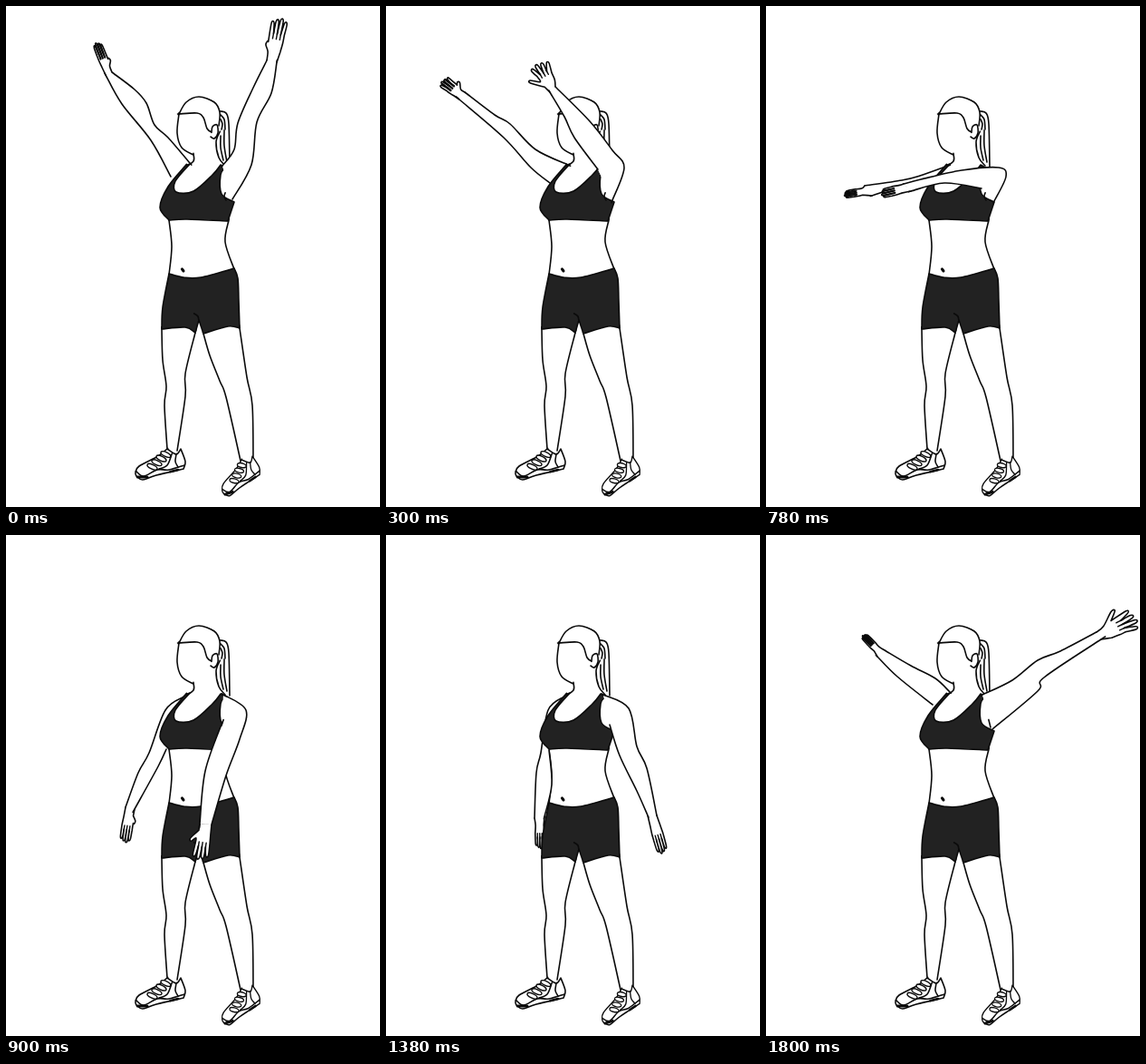
These frames come from a looping animation (413 by 552 pixels, 2100 ms). An HTML page with a canvas:

```html
<!DOCTYPE html>
<html lang="en">
<head>
<meta charset="utf-8">
<title>Arm circles</title>
<style>
html, body { margin: 0; width: 100%; height: 100%; overflow: hidden; background: #fff; }
canvas { display: block; width: 413px; height: 552px; }
</style>
</head>
<body>
<canvas id="stage"></canvas>
<script>
const W = 413, H = 552, HOLD = 300;
const INK = '#0a0a0a', CLOTH = '#222', SKIN = '#fff';
const canvas = document.getElementById('stage');
const ctx = canvas.getContext('2d');
const ratio = window.devicePixelRatio || 1;
canvas.width = W * ratio;
canvas.height = H * ratio;

const points = text => text.trim().split(/\s+/).map(p => p.split(',').map(Number));

// Adds a smooth curve through all the points.
function join(path, p) {
  for (let i = 0; i < p.length - 1; i++) {
    const a = p[i], b = p[i + 1], before = p[i - 1] || a, after = p[i + 2] || b;
    path.bezierCurveTo(
      a[0] + (b[0] - before[0]) / 6, a[1] + (b[1] - before[1]) / 6,
      b[0] - (after[0] - a[0]) / 6, b[1] - (after[1] - a[1]) / 6,
      b[0], b[1]);
  }
}

// Smooth runs that meet in corners.
function outline(runs) {
  const path = new Path2D();
  let last = runs[0][0];
  path.moveTo(...last);
  for (const run of runs) {
    join(path, [last, ...run]);
    last = run[run.length - 1];
  }
  return path;
}

function paint(path, fill, width = 1.6) {
  if (fill) {
    ctx.fillStyle = fill;
    ctx.fill(path);
  }
  ctx.lineWidth = width;
  ctx.stroke(path);
}

const shape = (text, fill, width) => paint(outline(text.split('/').map(points)), fill, width);
const line = (text, width) => shape(text, null, width);

// A hand from wrist a-b to the tip; thumb is its reach, negative on the side of a.
function hand(a, b, tip, { half, fan = 0, thumb = 0, ink = 1.4 }) {
  const mx = (a[0] + b[0]) / 2, my = (a[1] + b[1]) / 2;
  const ux = tip[0] - mx, uy = tip[1] - my, len = Math.hypot(ux, uy);
  const turn = (b[1] - a[1]) * ux - (b[0] - a[0]) * uy > 0 ? 1 : -1;
  const at = (s, t) => [mx + ux * s - turn * uy / len * t, my + uy * s + turn * ux / len * t];
  const runs = [[a]], side = Math.sign(thumb), w = half / 4;
  const thumbRun = () => {
    const out = side * (half + Math.abs(thumb)), s = 0.35 + Math.abs(thumb) / 40;
    const run = [at(0.2, side * half * 0.8), at(s - 0.06, out), at(s + 0.03, out - side), at(0.42, side * half)];
    runs.push(side < 0 ? run : run.reverse());
  };
  if (side < 0) thumbRun();
  else runs.push([at(0.25, -half * 0.9), at(0.5, -half)]);
  for (let i = 0; i < 4; i++) {
    const c = (i - 1.5) / 1.5, t = c * half * 0.75;
    const end = 1 - 0.09 * Math.abs(c - 0.2), mid = t + c * fan;
    runs.push([at(end - 0.06, mid - w * 0.8), at(end, mid), at(end - 0.06, mid + w * 0.8), at(0.62, t + w)]);
  }
  if (side > 0) thumbRun();
  else runs.push([at(0.45, half), at(0.25, half * 0.9)]);
  runs.push([b]);
  paint(outline(runs), SKIN);
  for (let i = 1; i < 4; i++) {
    const t = (i - 2) * half / 2;
    paint(outline([[at(0.52, t), at(ink > 2 ? 0.92 : 0.68, t)]]), null, ink);
  }
}

// One edge runs shoulder to wrist, the other wrist to armpit.
function arm(outer, inner, tip, look) {
  const p = points(outer), q = points(inner);
  const a = p[p.length - 1], b = q[0];
  const skin = outline([p, [b], q]);
  ctx.fillStyle = SKIN;
  ctx.fill(skin);
  hand(a, b, tip, look);
  ctx.fillStyle = SKIN;
  ctx.fill(skin);
  paint(outline([p]));
  paint(outline([q]));
}

function head() {
  line('237,116 243,118 246,130 247,177');
  line('237,120 241,125 242,136');
  line('237,125 239,130 238,136');
  line('236,139 232,150 235,167 242,176');
  line('237,144 237,156 240,170');
  line('241,138 241,154 244,172');
  line('191,119 189,140 194,156 207,164');
  line('207,163 207,171 197,178');
  line('191,119 199,106 213,100 230,106 236,117 235,132');
  line('191,119 211,118 218,123 222,135 227,139');
  shape('227,139 228,133 233,131 234,140 230,146 226,144', SKIN);
}

function legs() {
  line('180,236 183,265 180,296');
  line('246,236 242,260 252,290');
  line('172,356 173,390 177,419 175,440 178,488');
  line('209,360 198,405 198,430 189,490');
  line('218,361 225,385 236,413 243,431 259,501');
  line('258,355 266,409 272,440 273,502');
}

function shoe(...place) {
  ctx.save();
  ctx.transform(...place);
  shape('0,0 -10,8 -31,19 -35,26 -34,30/-27,34 -12,29 18,22/20,14 15,0/10,6 0,0', SKIN);
  line('-34,25 -26,30 -11,23 2,23 19,18');
  line('-32,31 -22,31', 3);
  line('4,25 12,23', 2.5);
  for (let i = 0; i < 4; i++) {
    const lace = new Path2D();
    lace.ellipse(-1.5 - 5 * i, 6 + 4.6 * i, 6, 2.4, 0.45, 0, Math.PI * 2);
    paint(lace, SKIN, 1.4);
  }
  line('5,6 0,18 -9,22');
  line('10,6 9,14 12,20');
  ctx.restore();
}

function clothes() {
  shape('198,176 179,199 170,222 180,236/200,235 245,237/252,216/238,207 237,186 242,178/237,175/228,186 207,204 188,205 187,193 203,174/198,176', CLOTH);
  shape('180,295/196,299 215,299 252,289/256,300 257,325 258,355/245,353 218,361/213,346/209,360/198,354 172,356/173,332 180,295', CLOTH);
  line('208,339 212,342 213,348');
  line('194.5,290 196,292', 3);
}

const armpit = () => line('242,206 241,210 243,214');

const high = {
  far() {
    arm('203,173 179,145 164,131 155,107 142,92 117,73', '110,76 128,108 160,148 182,188',
      [100, 40], { half: 5, thumb: -2, ink: 2.2 });
  },
  near() {
    arm('239,176 252,158 256,129 273,90 288,60', '299,62 293,96 277,128 271,175 250,213',
      [303, 13], { half: 8, fan: 1, thumb: -2 });
    armpit();
  }
};

const forward = {
  far() {
    arm('201,175 165,158 137,130 120,120 87,95', '81,103 130,145 160,178 181,195',
      [62, 82], { half: 6, fan: 1, thumb: -4, ink: 2.4 });
  },
  near() {
    arm('250,214 263,178 250,159 225,127 187,89', '181,95 197,122 208,145 234,180',
      [168, 63], { half: 8, fan: 3, thumb: 10 });
    armpit();
  }
};

const level = {
  far() {
    arm('201,176 170,187 150,192 109,198', '117,209 140,202 200,190',
      [86, 208], { half: 4, ink: 2.2 });
  },
  near() {
    arm('252,215 265,188 257,178 216,181 171,191 152,196', '160,204 197,195 238,201',
      [127, 207], { half: 5, ink: 2.2 });
    armpit();
  }
};

const low = {
  far() {
    arm('197,178 176,193 158,240 146,262 132,300', '142,302 168,255 177,236',
      [131, 339], { half: 6, thumb: 2 });
  },
  near() {
    arm('240,176 265,193 258,225 243,265 227,319', '214,318 220,260 239,206',
      [214, 358], { half: 8, fan: 1, thumb: 6 });
    line('240,204 238,210');
  }
};

const down = {
  far() {
    arm('197,178 179,193 171,240 166,262 164,312', '175,310 183,275 180,237',
      [170, 346], { half: 5 });
  },
  near() {
    arm('240,176 268,191 277,233 288,257 299,309', '289,309 277,282 258,243 247,209',
      [306, 351], { half: 6 });
  }
};

const back = {
  far() {
    arm('197,178 178,195 172,222 154,271', '167,267 178,237',
      [158, 293], { half: 7 });
  },
  near() {
    arm('240,176 269,185 305,213 357,261', '350,269 315,246 270,218 256,211 250,218',
      [385, 285], { half: 8, fan: 1, thumb: -5 });
    line('248,208 250,214');
  }
};

const wide = {
  far() {
    arm('203,173 187,158 160,144 131,127', '123,134 145,156 184,187',
      [107, 110], { half: 4, ink: 2.4 });
  },
  near() {
    arm('239,176 272,160 300,138 325,128 365,107', '370,115 307,157 300,172 250,214',
      [409, 91], { half: 9, fan: 3, thumb: -9 });
    line('246,204 248,212');
  }
};

const poses = [high, forward, level, low, down, back, wide];

function render(now) {
  const step = Math.floor(Math.max(0, now - start) / HOLD) % poses.length;
  ctx.setTransform(ratio, 0, 0, ratio, 0, 0);
  ctx.fillStyle = '#fff';
  ctx.fillRect(0, 0, W, H);
  ctx.strokeStyle = INK;
  ctx.lineCap = ctx.lineJoin = 'round';
  head();
  legs();
  shoe(1, 0, 0, 1, 178, 488);
  shoe(0.8, -0.26, 0.26, 0.955, 260, 500);
  poses[step].far();
  clothes();
  poses[step].near();
  requestAnimationFrame(render);
}

const start = performance.now();
render(start);
</script>
</body>
</html>
```
